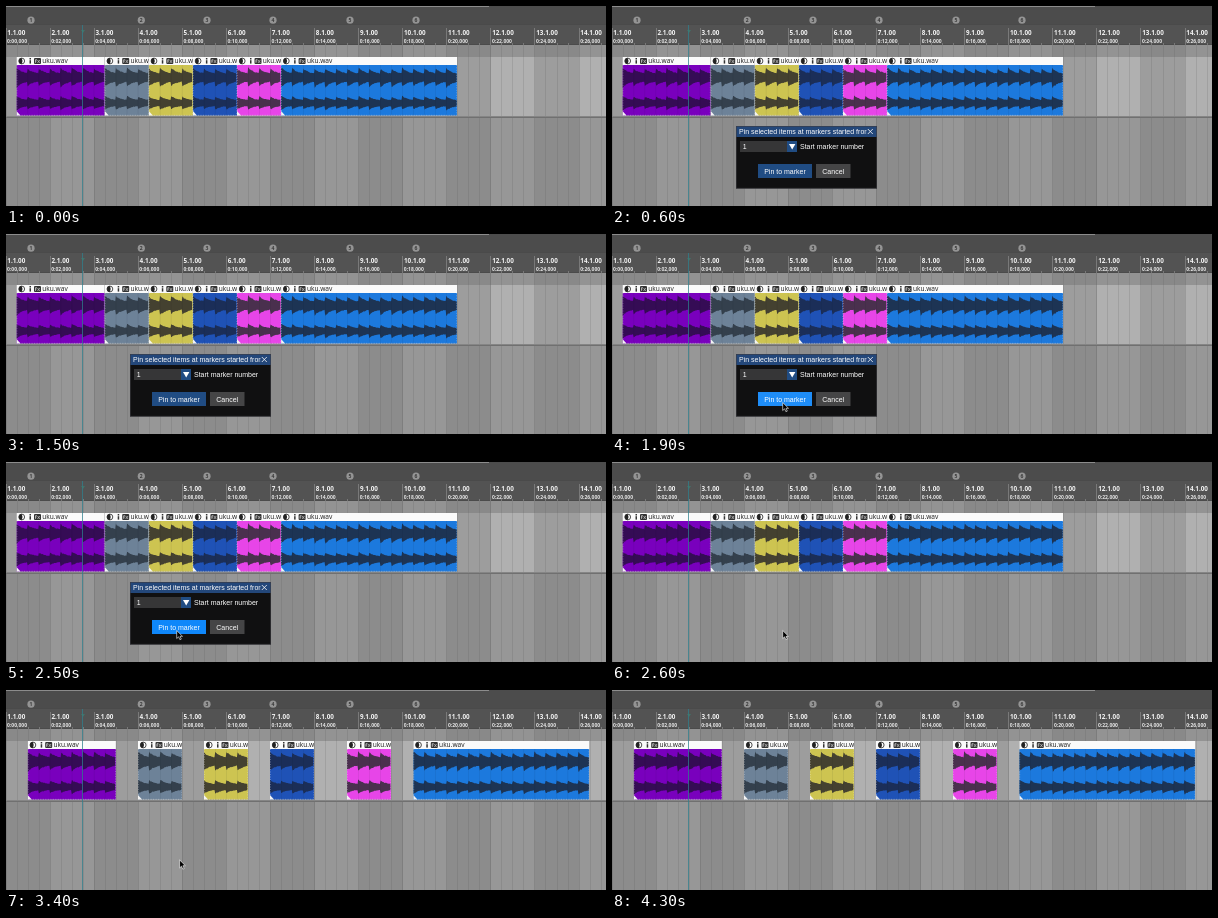
An HTML page that plays this animation: 600 px wide and 200 px high, repeating every 4.9 s.

```html
<!DOCTYPE html>
<html lang="en">
<head>
<meta charset="utf-8">
<title>Pin items to markers</title>
<style>
html, body { margin: 0; width: 100%; height: 100%; overflow: hidden; background: #888; }
svg { display: block; width: 100vw; height: 100vh; }
.bar { font: 700 6.3px "Open Sans", "Noto Sans", sans-serif; fill: #f4f4f4; }
.time { font: 700 5px "Open Sans", "Noto Sans", sans-serif; fill: #e6e6e6; }
.name { font: 400 6.6px "Open Sans", "Noto Sans", sans-serif; fill: #1c1c1c; }
.num { font: 700 5px "Open Sans", "Noto Sans", sans-serif; fill: #3a3a3a; text-anchor: middle; }
.ui { font: 7px "Liberation Sans", Arial, sans-serif; fill: #fff; }
</style>
</head>
<body>
<svg id="stage" viewBox="0 0 600 200" preserveAspectRatio="none"></svg>
<script>
const NS = "http://www.w3.org/2000/svg";
const stage = document.getElementById("stage");
const LOOP = 4900, STEP = 100, BAR = 44.08, BEAT = BAR / 4;
const OPEN = 600, PRESS = 2500, CLOSE = 2600, PIN = 2700;

function add(parent, tag, attrs = {}, text) {
  const el = document.createElementNS(NS, tag);
  for (const k in attrs) el.setAttribute(k, attrs[k]);
  if (text !== undefined) el.textContent = text;
  parent.appendChild(el);
  return el;
}
const rect = (p, x, y, width, height, fill, more) =>
  add(p, "rect", { x, y, width, height, fill, ...more });
const label = (p, x, y, cls, text) => add(p, "text", { x, y, class: cls }, text);
const show = (el, on) => el.setAttribute("visibility", on ? "visible" : "hidden");
const noise = n => {
  const v = Math.sin(n * 12.9898) * 43758.5453;
  return v - Math.floor(v);
};

function drawGrid() {
  // y, height, even bar, odd bar
  const lanes = [[39, 12, "#898989", "#939393"], [51, 60, "#9d9d9d", "#b0b0b0"], [111, 89, "#8c8c8c", "#979797"]];
  for (const [y, h, even, odd] of lanes)
    for (let i = 0; i < 14; i++)
      rect(stage, Math.round(i * BAR), y, 45, h, i % 2 ? odd : even);
  for (let i = 0; i * BEAT < 600; i++)
    rect(stage, Math.floor(i * BEAT), 39, 1, 161, "#505050", { opacity: i % 4 ? .16 : .22 });
  rect(stage, 0, 110, 600, 1, "#858585");
  rect(stage, 0, 111, 600, 1, "#707070");
}

function drawRuler() {
  rect(stage, 0, 0, 600, 18, "#4c4c4c");
  rect(stage, 0, 0, 483, 1, "#8c8c8c");
  rect(stage, 0, 18, 600, 21, "#535353");
  rect(stage, 0, 18, 600, 1, "#4a4a4a");
  rect(stage, 0, 38, 600, 1, "#4b4b4b");
  for (let i = 0; i * BEAT < 600; i++) {
    const x = Math.floor(i * BEAT), main = i % 4 === 0;
    rect(stage, x, main ? 22 : 37, 1, main ? 17 : 2, "#8b8b8b", { opacity: .7 });
  }
  for (let i = 0; i < 14; i++) {
    const x = i * BAR + 1.3;
    label(stage, x, 29.3, "bar", `${i + 1}.1.00`);
    label(stage, x - .2, 36.7, "time", `0:${String(i * 2).padStart(2, "0")}.000`);
  }
  [25, 135.3, 201, 267, 344, 410].forEach((x, i) => {
    add(stage, "circle", { cx: x, cy: 14.2, r: 3.6, fill: "#949494" });
    label(stage, x, 16, "num", i + 1);
  });
}

// Plucked notes: a tall attack on each beat, then a smooth decay.
function wavePath(width, start, mid, size) {
  const level = (s, side) => {
    const note = Math.floor(s / BEAT), phase = s / BEAT - note;
    const attack = .72 + .28 * noise(note + side * 31);
    const body = .3 + .7 * attack * Math.exp(-phase * 1.7);
    return size * body * (.92 + .14 * noise(Math.floor(s * 1.2) + side * 97));
  };
  const top = [], low = [];
  for (let x = 0; x <= width; x += .7) {
    top.push(`${x.toFixed(1)} ${(mid - level(x + start, 1)).toFixed(2)}`);
    low.unshift(`${x.toFixed(1)} ${(mid + level(x + start, 2)).toFixed(2)}`);
  }
  return `M${top.concat(low).join("L")}Z`;
}

// before, after, width, fill, wave
const clips = [
  [10.5, 21.7, 88.2, "#7900bd", "#350c55"],
  [98.7, 132, 44.1, "#6d8298", "#34404d"],
  [142.8, 198, 44.1, "#cdc451", "#444130"],
  [186.9, 264, 44.1, "#1f52b6", "#1b2e58"],
  [231, 341, 44.1, "#e745e8", "#4a304e"],
  [275.1, 407.3, 176, "#1c79dd", "#1d3454"]
];

function drawClip([before, , w, fill, wave], i) {
  const clip = add(add(stage, "defs"), "clipPath", { id: "clip" + i });
  rect(clip, 0, 50, w, 60, "#000");
  const g = add(stage, "g");
  const p = add(g, "g", { "clip-path": `url(#clip${i})` });
  rect(p, 0, 51, w, 8, "#fafafa");
  rect(p, 0, 59, w, 50.5, fill);
  add(p, "path", { d: wavePath(w, before - 10.5, 71.5, 10.5), fill: wave });
  add(p, "path", { d: wavePath(w, before - 10.5, 97, 7.6), fill: wave });
  for (let x = BEAT; x < w - 1; x += BEAT) rect(p, x, 59, .6, 50, "#101820", { opacity: .1 });
  add(p, "path", { d: `M.4 59V109.3H${w - .4}V59`, fill: "none", stroke: "#fff", "stroke-width": .6, "stroke-dasharray": "1 1.5", opacity: .5 });
  add(p, "path", { d: "M0 105L4 109.5H0Z", fill: "#f4f4f4" });
  add(p, "circle", { cx: 5.2, cy: 55, r: 2.9, fill: "#fff", stroke: "#222", "stroke-width": .8 });
  add(p, "path", { d: "M5.2 52.1A2.9 2.9 0 0 0 5.2 57.9L6 55Z", fill: "#222" });
  rect(p, 13, 52, 1.5, 1.5, "#333");
  rect(p, 13, 54.2, 1.5, 3.4, "#333");
  rect(p, 17.5, 52, 7, 6, "#333", { rx: 1 });
  add(p, "path", { d: "M19 57V53.6H20.5M18.5 55H20.2M21 54L23.3 57M23.3 54L21 57", stroke: "#ddd", "stroke-width": .6, fill: "none" });
  label(p, 25.8, 57.3, "name", "uku.wav");
  return g;
}

function drawDialog() {
  const g = add(stage, "g");
  rect(g, 124, 120, 141, 62.5, "#101011");
  rect(g, 124, 120, 141, 11, "#23477a");
  rect(g, 124.3, 120.3, 140.4, 61.9, "none", { stroke: "#3c3c42", "stroke-width": .6 });
  const clip = add(add(g, "defs"), "clipPath", { id: "title" });
  rect(clip, 124, 120, 130.5, 11, "#000");
  add(g, "text", { x: 127, y: 128, class: "ui", "clip-path": "url(#title)" }, "Pin selected items at markers started from");
  add(g, "path", { d: "M255.8 123L260.8 128M260.8 123L255.8 128", stroke: "#fff", "stroke-width": .8 });
  rect(g, 128, 135, 57, 11, "#363637");
  rect(g, 175, 135, 10, 11, "#204c83");
  add(g, "path", { d: "M177 138H183.4L180.2 143.6Z", fill: "#fff" });
  label(g, 130.8, 143, "ui", "1");
  label(g, 188, 143, "ui", "Start marker number");
  const pin = rect(g, 146, 158, 54, 14, "#204c83");
  rect(g, 204, 158, 34.5, 14, "#454546");
  label(g, 152.2, 167.5, "ui", "Pin to marker");
  label(g, 210.3, 167.5, "ui", "Cancel");
  return { g, pin };
}

drawGrid();
drawRuler();
const items = clips.map(drawClip);
rect(stage, 76, 19, 1, 181, "#2f7f8c", { opacity: .75 });
add(stage, "path", { d: "M75 24H79L77 27Z", fill: "#3c8073", opacity: .7 });
const dialog = drawDialog();
const pointer = add(stage, "path", {
  d: "M0 0V8L1.9 6.3L3.2 9.2L4.6 8.6L3.3 5.8H5.8Z",
  fill: "#000", stroke: "#fff", "stroke-width": .6
});

// The pointer slides in from the lower right and leaves the same way.
const REST = [170.7, 168.5], EDGE = [235, 200];
function pointerAt(t) {
  const away = t < 1900 ? ((1900 - t) / 400) ** 1.3
    : t < 3300 ? 0
    : t < 3700 ? .045
    : .045 + ((t - 3600) / 300) ** 1.3;
  return away < 1 ? REST.map((v, i) => v + (EDGE[i] - v) * away) : null;
}

function render(now) {
  const t = Math.floor((now % LOOP) / STEP) * STEP;
  const at = pointerAt(t);
  show(pointer, at);
  if (at) pointer.setAttribute("transform", `translate(${at})`);
  const hover = at && at[0] >= 146 && at[0] <= 200 && at[1] <= 172;
  dialog.pin.setAttribute("fill", !hover ? "#204c83" : t < PRESS ? "#1e8df8" : "#0f87fa");
  show(dialog.g, t >= OPEN && t < CLOSE);
  items.forEach((g, i) => g.setAttribute("transform", `translate(${clips[i][t < PIN ? 0 : 1]} 0)`));
}

const start = performance.now();
function tick() {
  render(performance.now() - start);
  requestAnimationFrame(tick);
}
tick();
</script>
</body>
</html>
```
